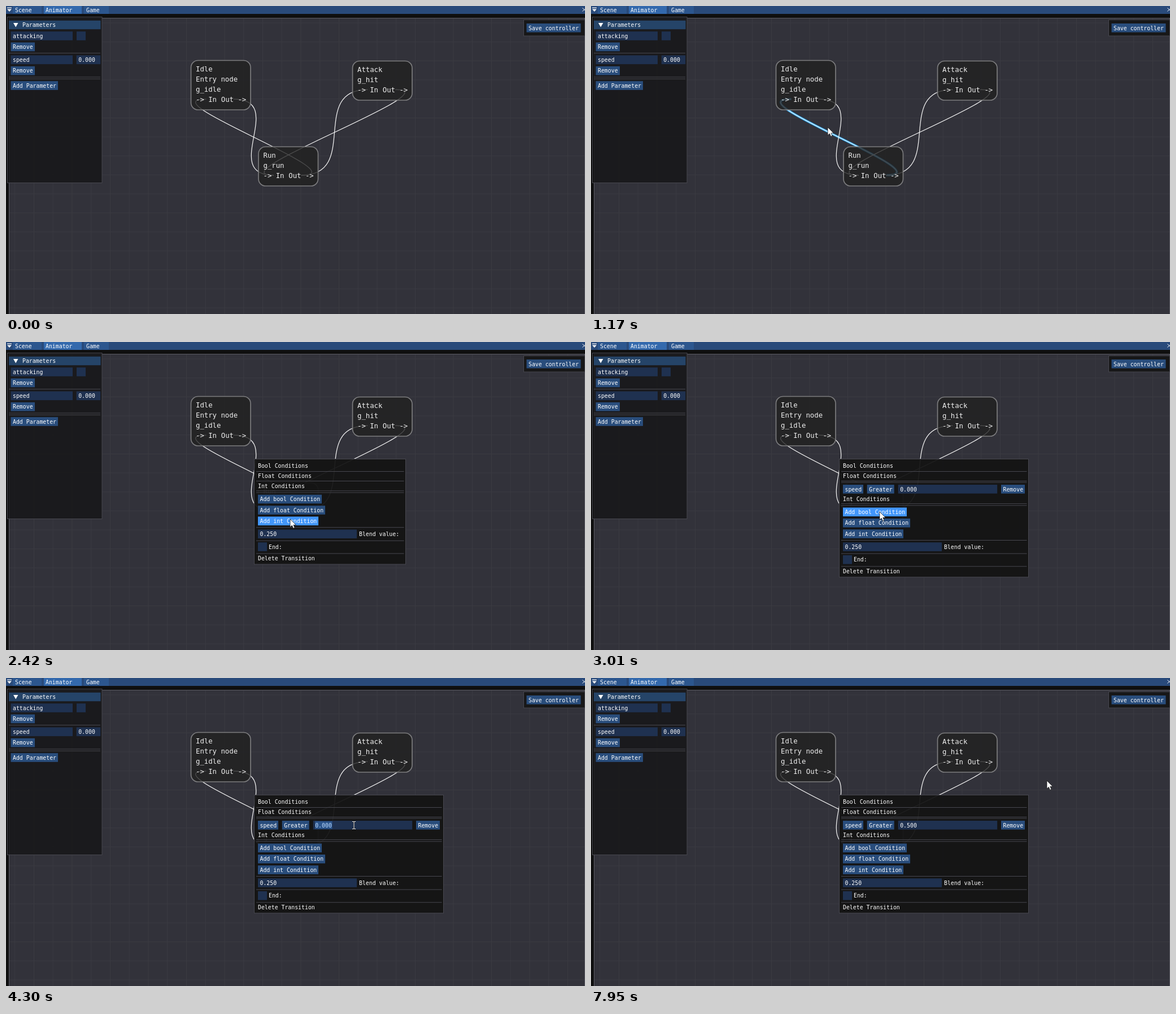
An HTML page for the animation above (8000 ms loop, 1025x546 px).

```html
<!DOCTYPE html>
<html lang="en">
<head>
<meta charset="utf-8">
<title>Animator</title>
<style>
html, body { margin: 0; width: 100%; height: 100%; overflow: hidden; background: #0f0f0f; }
svg { display: block; width: 100%; height: 100%; }
text { font: 9.85px "DejaVu Sans Mono", "Liberation Mono", monospace; fill: #fff; }
.node text { font-size: 12.3px; fill: #f0f0f0; }
</style>
</head>
<body>
<svg id="stage" viewBox="0 0 1025 546"></svg>
<script>
const LOOP = 8000;
const BUTTON = '#294d7c', HOVER = '#4296fa', ACTIVE = '#0f87fa', FRAME = '#1f3150';
const BORDER = '#47474f', POPUP = 'rgba(20,20,20,.94)';
const stage = document.getElementById('stage');

function add(parent, tag, attrs) {
  const el = document.createElementNS('http://www.w3.org/2000/svg', tag);
  for (const key in attrs) el.setAttribute(key, attrs[key]);
  parent.append(el);
  return el;
}
const group = (parent, attrs) => add(parent, 'g', attrs);
const box = (g, x, y, width, height, fill, more) => add(g, 'rect', { x, y, width, height, fill, ...more });
const path = (g, d, more) => add(g, 'path', { d, fill: 'none', ...more });
const rule = (g, x1, x2, y) => path(g, `M${x1} ${y}H${x2}`, { stroke: BORDER });
const show = (el, on) => el.setAttribute('visibility', on ? 'visible' : 'hidden');

// Vertical positions of labels and controls are given by their centre line.
function label(g, x, cy, string, drop = 3.7) {
  const el = add(g, 'text', { x, y: cy + drop });
  el.textContent = string;
  return el;
}
function field(g, x, cy, width, string) {
  box(g, x, cy - 7.8, width, 15.6, FRAME);
  return label(g, x + 3.5, cy, string);
}
function button(g, x, cy, width, string) {
  const face = box(g, x, cy - 7.8, width, 15.6, BUTTON);
  label(g, x + 3.5, cy, string);
  return { face, x, cy, width };
}

// Canvas and grid
box(stage, 0, 0, 1025, 546, '#0f0f0f');
box(stage, 5.5, 21.5, 1019, 560, '#32323a', { stroke: '#5b5b63' });
let grid = '';
for (let i = 0; i < 31; i++) grid += `M${15.7 + 33.75 * i} 22V546`;
for (let i = 0; i < 16; i++) grid += `M6 ${30 + 33.67 * i}H1024`;
path(stage, grid, { stroke: '#3b3b42' });

// Links and nodes
const links = group(stage);
const nodes = group(stage, { class: 'node' });

function node(x, y, height, lines) {
  box(nodes, x, y, 105.5, height, 'rgba(32,32,32,.79)', { rx: 12.5, stroke: '#7c7c7e', 'stroke-width': 1.7 });
  lines.forEach((line, i) => label(nodes, x + 8.5, y + 15.3 + 18 * i, line, 4.4));
  const cy = y + height - 18.5;
  label(nodes, x + 8.5, cy, '-> In', 4.4);
  label(nodes, x + 53.3, cy, 'Out ->', 4.4);
  return { input: [x + 27, cy - .5], output: [x + 75.5, cy - .5] };
}
const idle = node(327.5, 96.5, 87.5, ['Idle', 'Entry node', 'g_idle']);
const attack = node(613.5, 97.5, 69.5, ['Attack', 'g_hit']);
const run = node(447, 249.5, 69.5, ['Run', 'g_run']);

function link({ output: [x1, y1] }, { input: [x2, y2] }) {
  const half = Math.hypot(x2 - x1, y2 - y1) / 2;
  const pull = 106 * Math.sin(Math.PI / 2 * Math.min(1, half / 106));
  const d = `M${x1} ${y1}C${x1 + pull} ${y1} ${x2 - pull} ${y2} ${x2} ${y2}`;
  const glow = path(links, d, { stroke: '#32b0ff', 'stroke-width': 3.6 });
  path(links, d, { stroke: '#f4f4f4', 'stroke-width': 1.25 });
  return glow;
}
const runToIdle = link(run, idle);
const idleToRun = link(idle, run);
show(link(run, attack), false);
show(link(attack, run), false);

// Title bar with tabs
box(stage, 0, 0, 1025, 14, '#294a7a');
box(stage, 12, 0, 51, 14, '#2c568e');
box(stage, 67, 0, 67, 14, '#3369ad');
box(stage, 138, 0, 44, 14, '#2c568e');
path(stage, 'M2 2.5H10V3.7H2ZM2 5.5H10L6 10Z', { fill: '#fff' });
label(stage, 16, 6.8, 'Scene');
label(stage, 70, 6.8, 'Animator');
label(stage, 142, 6.8, 'Game');
path(stage, 'M1020.5 3.5L1026.5 9.5M1020.5 9.5L1026.5 3.5', { stroke: '#fff' });

// Parameters panel
box(stage, 2.5, 19.5, 167.5, 294, 'rgba(20,20,22,.8)', { stroke: BORDER });
box(stage, 5, 25.8, 162.5, 15.4, '#254468');
path(stage, 'M13 30H21.5L17.2 37.5Z', { fill: '#fff' });
label(stage, 29, 33.5, 'Parameters');
field(stage, 8.5, 53, 109.5, 'attacking');
box(stage, 125, 45.2, 16, 15.6, FRAME);
button(stage, 8.5, 72.4, 42.5, 'Remove');
rule(stage, 5, 167, 83.5);
field(stage, 8.5, 95.3, 109.5, 'speed');
field(stage, 124.7, 95.3, 42.5, '0.000');
button(stage, 8.5, 114.7, 42.5, 'Remove');
rule(stage, 5, 167, 126);
rule(stage, 5, 167, 129.2);
button(stage, 8.5, 141, 83.5, 'Add Parameter');

// Save panel
box(stage, 916.5, 24.5, 108, 28.5, 'rgba(20,20,20,.9)', { stroke: BORDER });
button(stage, 921.5, 38.8, 96, 'Save controller');

// Transition menu, with or without a float condition row
function menu(right, shift) {
  const g = group(stage);
  const line = y => rule(g, 443, right - 3, y);
  box(g, 439.5, 207.5, right - 439.5, 186.5 + shift, POPUP, { stroke: BORDER });
  label(g, 446, 219.3, 'Bool Conditions');
  line(229.5);
  label(g, 446, 237.3, 'Float Conditions');
  line(246.5);
  const lower = group(g, { transform: `translate(0 ${shift})` });
  const low = y => rule(lower, 443, right - 3, y);
  label(lower, 446, 255.2, 'Int Conditions');
  low(263.8);
  low(267);
  const buttons = [
    button(lower, 446, 278.5, 113, 'Add bool Condition'),
    button(lower, 446, 298, 119, 'Add float Condition'),
    button(lower, 446, 317.3, 107, 'Add int Condition')
  ];
  buttons.forEach(b => b.cy += shift);
  low(328.7);
  field(lower, 446, 340.3, 175, '0.250');
  label(lower, 625, 340.3, 'Blend value:');
  low(352.3);
  box(lower, 446, 355.2, 16, 15.6, FRAME);
  label(lower, 465, 363, 'End:');
  low(375);
  label(lower, 446, 383.5, 'Delete Transition');
  return { g, buttons, line };
}
const small = menu(707.5, 0);
const large = menu(774.5, 22.8);
large.line(249);
button(large.g, 446, 260.8, 36, 'speed');
button(large.g, 488.7, 260.8, 48, 'Greater');
const value = field(large.g, 543.7, 260.8, 175.5, '0.000');
const selection = box(large.g, 547, 254, 30.5, 13.5, HOVER, { opacity: .35 });
const caret = box(large.g, 0, 255.5, 1, 10.5, '#fff');
button(large.g, 726, 260.8, 42, 'Remove');

// Pointers
const arrow = path(stage, 'M0 0V14.2L3.3 11.2L5.6 16.4L8 15.4L5.8 10.3H10.3Z',
  { fill: '#fff', stroke: '#111', 'stroke-width': .7 });
const beam = group(stage);
const beamShape = 'M-3 -6.5H-1L0 -5.8L1 -6.5H3M0 -5.8V5.8M-3 6.5H-1L0 5.8L1 6.5H3';
path(beam, beamShape, { stroke: '#111', 'stroke-width': 2 });
path(beam, beamShape, { stroke: '#fff' });

// time, x, y
const route = [
  [80, 822, 520], [250, 690, 400], [450, 540, 300], [650, 440, 246], [840, 402, 231],
  [890, 404, 228], [1170, 419, 215], [1410, 438, 207], [1690, 438, 207],
  [1900, 455, 236], [2100, 482, 280], [2310, 499, 312], [2420, 503, 314],
  [2690, 511, 301], [3200, 511, 301], [3540, 521, 273], [3970, 569, 259],
  [4010, 573, 258], [4240, 616, 261], [7280, 616, 261], [7340, 628, 266],
  [7520, 628, 266], [7600, 650, 274], [7700, 702, 257], [7800, 760, 216], [7950, 807, 182]
];
const typed = [[0, '0.000'], [5250, '0'], [5530, '0.'], [6240, '0.5'], [6530, '0.500']];

function pointerAt(t) {
  const next = route.findIndex(p => p[0] > t);
  if (next < 1) return route[next < 0 ? route.length - 1 : 0].slice(1);
  const [t0, x0, y0] = route[next - 1], [t1, x1, y1] = route[next];
  const k = (t - t0) / (t1 - t0);
  return [x0 + (x1 - x0) * k, y0 + (y1 - y0) * k];
}

function render(t) {
  const within = (from, to) => t >= from && t < to;
  const [x, y] = pointerAt(t);
  const opened = t >= 1550, expanded = t >= 3010;
  const over = (left, width, cy) => x >= left && x <= left + width && Math.abs(y - cy) < 7.8;

  show(runToIdle, within(950, 1320));
  show(idleToRun, within(1320, 1550));
  small.g.style.display = opened && !expanded ? '' : 'none';
  large.g.style.display = expanded ? '' : 'none';

  const pressed = within(2970, 3010);
  for (const b of (expanded ? large : small).buttons) {
    const fill = over(b.x, b.width, b.cy) ? (pressed ? ACTIVE : HOVER) : BUTTON;
    b.face.setAttribute('fill', fill);
  }

  const string = typed.filter(step => step[0] <= t).pop()[1];
  value.textContent = string;
  show(selection, within(4300, 5250));
  show(caret, within(5250, 6530));
  caret.setAttribute('x', 547.5 + 5.93 * string.length);

  const editing = expanded && over(543.7, 175.5, 260.8);
  show(arrow, t >= 80 && !editing);
  show(beam, editing);
  for (const el of [arrow, beam]) el.setAttribute('transform', `translate(${x} ${y})`);
}

const start = performance.now();
function tick() {
  render((performance.now() - start) % LOOP);
  requestAnimationFrame(tick);
}
tick();
</script>
</body>
</html>
```
